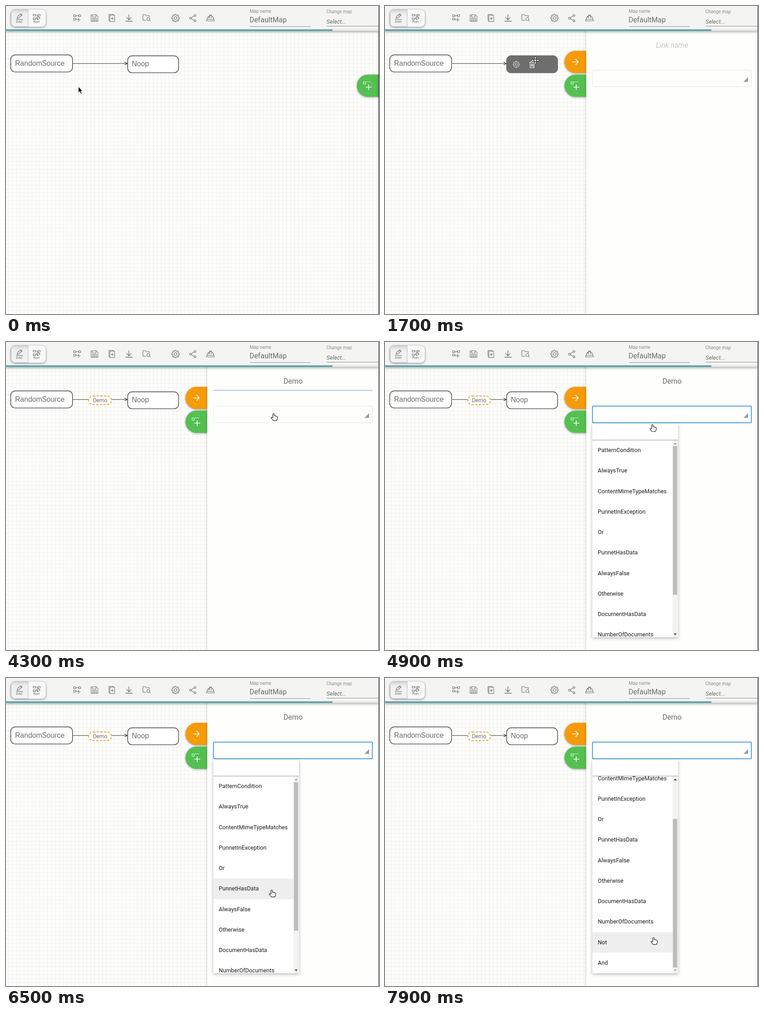
An HTML page that plays this animation: 824x680 px, repeating every 8 s.

```html
<!DOCTYPE html>
<html lang="en">
<head>
<meta charset="utf-8">
<title>Link condition demo</title>
<style>
  html, body { margin: 0; width: 100%; height: 100%; overflow: hidden; background: #fefefd; }
  svg { display: block; }
  text { font-family: Roboto, sans-serif; fill: #6b6b6b; }
  .node rect { fill: #fff; stroke: #707070; stroke-width: 1.9; }
  .node text { font: 15.75px "Liberation Sans", Arial, sans-serif; }
  .icon { fill: none; stroke: #6a6a6a; stroke-width: 1.05; stroke-linejoin: round; }
  .white { stroke: #fff; }
  .label { font-size: 10.05px; fill: #8c8c8c; }
  .small { font-size: 8px; letter-spacing: .3px; text-anchor: middle; }
  .middle { text-anchor: middle; }
  .rule { stroke: #8a8a8a; }
  .tab { filter: drop-shadow(0 1px 2px rgba(0,0,0,.4)); }
  #items text { font-size: 12.67px; fill: #1d1d1d; }
</style>
</head>
<body>
<svg width="824" height="680" viewBox="0 0 824 680">
  <defs>
    <pattern id="grid" x="4.8" y="4.8" width="8.66" height="8.66" patternUnits="userSpaceOnUse">
      <path d="M0 .5H8.66M.5 0V8.66" stroke="#eeeeeb" fill="none"/>
    </pattern>
    <linearGradient id="inset" x2="0" y2="1">
      <stop stop-color="#d9d9d9"/><stop offset=".25" stop-color="#efefef"/><stop offset="1" stop-color="#f3f3f3"/>
    </linearGradient>
    <clipPath id="listClip"><rect x="458" y="217" width="190" height="435"/></clipPath>
    <path id="gear"/>
    <path id="flow" d="M-7.500-6.500h4.500v4h-4.500zM3.500-6.500h4.500v4H3.500zM-3-4.500H3.500M-7.500 1h4.500v4h-4.500zM-3 3H-.5M3.500 0V9M-1 4.500H8"/>
    <path id="tabShape" d="M49 0H24.500a24.500 24.500 0 0 0 0 49H49z"/>
  </defs>

  <rect width="824" height="680" fill="#fefefd"/>
  <rect y="55" width="813" height="625" fill="url(#grid)"/>

  <g stroke="#333" fill="none" stroke-width="1.2"><path d="M148 127H268M262 124L268.500 127 262 130"/></g>
  <g class="node">
    <rect x="10.500" y="108" width="136.500" height="37.600" rx="10"/>
    <text x="20" y="131.800">RandomSource</text>
    <rect id="noop" x="268.800" y="110" width="112.400" height="37.400" rx="10"/>
    <text id="noopText" x="278" y="133.300">Noop</text>
  </g>
  <g id="noopTools" class="icon white">
    <use href="#gear" transform="translate(290 129) scale(.82)"/>
    <path d="M319 124.500h12M322.500 124.500v-2.500h5v2.500M320 124.500l.8 12h8.400l.8-12M323 127v7M325 127v7M327 127v7"/>
  </g>
  <g id="chip">
    <rect id="chipBox" y="119.300" height="19" rx="9.500" fill="#fff" stroke="#e5a62c" stroke-width="1.900" stroke-dasharray="5 3"/>
    <text id="chipText" class="middle" x="208" y="132.800" font-size="12"/>
  </g>

  <g id="panel">
    <g id="linkTab" class="tab">
      <use href="#tabShape" x="-48" y="99" fill="#f59a08"/>
      <path d="M-31 123.500h13M-24 117l6.500 6.500-6.500 6.500" fill="none" stroke="#fff" stroke-width="1.600"/>
    </g>
    <g class="tab">
      <use href="#tabShape" x="-48" y="151.500" fill="#54c052"/>
      <path d="M-22 173v12.500M-28 179.300h12.500" fill="none" stroke="#fff" stroke-width="1.500"/>
      <path d="M-33.500 167.500h5v5h-5z" fill="none" stroke="#fff"/>
      <path d="M-27 167.500H-17" stroke="#fff" stroke-dasharray="3 1.500"/>
    </g>
    <rect id="sheet" y="50" width="390" height="640" fill="#fefefd" style="filter:drop-shadow(-1px 0 2px rgba(0,0,0,.2))"/>
    <text id="linkName" class="middle" x="189.500" y="92.300" font-size="16"/>
    <path id="caret" stroke="#444" fill="none"/>
    <path id="underline" stroke="#5b9fc4" stroke-width="1.200"/>
    <rect id="select" x="13.800" y="141.500" width="351" height="36.700" rx="2" fill="none"/>
    <path d="M347.500 167.500l10-10.500v10.500z" fill="#999"/>
  </g>

  <g id="dropdown">
    <rect x="458" y="180" width="189.500" height="472" fill="#fff" style="filter:drop-shadow(0 2px 3px rgba(0,0,0,.3))"/>
    <g clip-path="url(#listClip)">
      <g id="items"><rect id="hover" x="458" width="177" height="45.250" fill="#eee"/></g>
      <rect x="635" y="217" width="12" height="435" fill="#f3f3f3"/>
      <rect id="thumb" x="636" width="9.500" height="328" fill="#bdbdbd"/>
      <path id="up" d="M637.500 226h7l-3.500-4z"/>
      <path id="down" d="M637.500 643.500h7l-3.500 4z"/>
    </g>
    <path d="M458 216.500H647.500" stroke="#999"/>
  </g>

  <g id="toolbar">
    <rect width="824" height="55" fill="#f4f4f3" style="filter:drop-shadow(0 2px 3px rgba(0,0,0,.35))"/>
    <rect y="51.500" width="824" height="3.500" fill="#e4e6e6"/>
    <rect y="51.500" width="721" height="3.500" fill="#59a3a8"/>
    <rect x="11" y="8" width="77" height="38" rx="9" fill="#f8f8f8" style="filter:drop-shadow(0 1px 2px rgba(0,0,0,.5))"/>
    <path d="M49 8.500H20a8.500 8.500 0 0 0-8.500 8.500V37a8.500 8.500 0 0 0 8.500 8.500H49z" fill="url(#inset)" stroke="#bbb"/>
    <text class="small" x="29.500" y="37.300">Edit</text>
    <text class="small" x="67.500" y="37.300">Run</text>
    <g class="icon">
      <path d="M24.500 27l1.200-4 7.300-6 2.800 3-7.300 6zM31 18.600l2.800 3M22 29.500h15.500"/>
      <path d="M60 18.500h5v3.500H60zM60 26.500h5v3.500H60zM65 20.300H71M65 28.300H67.500V24M69.500 22.800l6 3.700-6 3.700zM71 18.500h4.500v3.500H71z"/>
      <use href="#flow" x="157" y="26"/>
      <path d="M188 19.500h12l3 3V34h-15zM191 19.500v5h8v-5M191 34v-6.500h9V34M193 30h5M193 32h5"/>
      <path d="M229.500 20.500h10.500V34.500h-10.500zM229.500 32h-2V18.500h10v2M234.800 24v7M231.300 27.500h7"/>
      <path d="M271.500 18.500V30M266 25l5.500 5.500 5.500-5.500M264 33.500h15.500" stroke-width="1.300"/>
      <path d="M310 31.500h-7.500V19h5l2 2.500h7.500v3M319.500 34l-3-3"/>
      <circle cx="314.500" cy="28.800" r="3.200"/>
      <use href="#gear" x="374.500" y="26.500"/>
      <path d="M409.500 25.800l6-4M409.500 27.800l6 3.700"/>
      <circle cx="407.500" cy="26.800" r="2.100"/><circle cx="417.500" cy="20.800" r="2.100"/><circle cx="417.500" cy="32.500" r="2.100"/>
      <path d="M443.500 29.500h16.500v3.500h-16.500zM445 29.500v-2a6.800 6.800 0 0 1 13.500 0v2M449.800 27V19.500h4V27M447.800 23v3"/>
    </g>
    <text class="label" x="538.500" y="15.300">Map name</text>
    <text x="538" y="36" font-size="15.850">DefaultMap</text>
    <text class="label" x="707.700" y="16">Change map</text>
    <text x="708" y="39" font-size="12.700" font-style="italic">Select...</text>
    <path class="rule" d="M539 45.500H673M708 44.500H823"/>
  </g>
  <rect x="823" width="1" height="680" fill="#2b2b2b"/>

  <g id="cursors" stroke-linejoin="round">
    <path id="arrow" d="M0 0V13.500L3 10.800 5.200 15.800 7.500 14.800 5.300 10H9z" fill="#111" stroke="#fff" stroke-width=".7"/>
    <path id="hand" d="M-1.500 1Q0-1 1.500 1V5Q4.500 4.500 6.500 6 8.800 6.300 8.800 8.500L8 13Q7.500 15.300 5 15.300H0Q-2 15-3 12.500L-5.500 9.300Q-5 7.300-1.500 9.300z" fill="#fff" stroke="#222" stroke-width="1.200"/>
    <g id="move" stroke="#222" fill="#fff">
      <path d="M0-8.500L3-5H1.200V-1.200H5V-3L8.500 0 5 3V1.200H1.200V5H3L0 8.500-3 5H-1.200V1.200H-5V3L-8.500 0-5-3V-1.200H-1.200V-5H-3z"/>
      <circle r="2.500"/>
    </g>
    <path id="beam" d="M-3-8H-1L0-7 1-8H3M0-7V7M-3 8H-1L0 7 1 8H3" fill="none" stroke="#333"/>
  </g>
</svg>
<script>
const LOOP = 8000, STEP = 100, ROW = 45.25, LIST_TOP = 216.6;
const $ = id => document.getElementById(id);
const set = (id, attrs) => { for (const k in attrs) $(id).setAttribute(k, attrs[k]); };
const show = (id, on) => set(id, { visibility: on ? "visible" : "hidden" });
const clamp = v => Math.max(0, Math.min(1, v));
const ease = v => v * v * (3 - 2 * v);

const names = ["PatternCondition", "AlwaysTrue", "ContentMimeTypeMatches", "PunnetInException", "Or",
  "PunnetHasData", "AlwaysFalse", "Otherwise", "DocumentHasData", "NumberOfDocuments", "Not", "And"];
names.forEach((name, i) => {
  const text = document.createElementNS("http://www.w3.org/2000/svg", "text");
  text.setAttribute("x", 470);
  text.setAttribute("y", LIST_TOP + ROW * i + 26.6);
  text.textContent = name;
  $("items").append(text);
});

function gearPath() {
  const point = (r, a) => `${(r * Math.cos(a)).toFixed(2)} ${(r * Math.sin(a)).toFixed(2)}`;
  const points = [];
  for (let i = 0; i < 8; i++)
    for (const [r, d] of [[6.3, -.26], [8.6, -.17], [8.6, .17], [6.3, .26]])
      points.push(point(r, i * Math.PI / 4 + d));
  return `M${points.join("L")}zM3 0A3 3 0 1 1-3 0A3 3 0 1 1 3 0`;
}
set("gear", { d: gearPath() });

// Each row: time followed by the values reached at that time.
const pointer = [[0, 160, 178], [300, 160, 178], [400, 163, 174], [500, 163, 174], [900, 190, 127],
  [1600, 190, 127], [1700, 332, 120], [2000, 640, 87], [3800, 640, 87], [4300, 591, 158], [4800, 592, 162],
  [5500, 582.5, 305], [5700, 583, 325], [6500, 587, 468], [6700, 587, 472], [7400, 589, 530], [7900, 593, 573]];
const scrolling = [[0, 0], [6900, 0], [7400, 87], [7500, 87], [7700, 108]];

function sample(keys, t) {
  const next = keys.findIndex(key => key[0] > t);
  if (next < 0) return keys.at(-1).slice(1);
  const a = keys[next - 1], b = keys[next], p = (t - a[0]) / (b[0] - a[0]);
  return a.slice(1).map((v, i) => v + (b[i + 1] - v) * p);
}

function hoveredRow(t) {
  const y = sample(pointer, t)[1];
  return y < 217 ? -1 : Math.floor((y - LIST_TOP + sample(scrolling, t)[0]) / ROW);
}

function drawLink(t) {
  const typed = "Demo".slice(0, [2800, 3000, 3200, 3300].filter(at => t >= at).length);
  const onNoop = t === 1700;
  show("noopText", !onNoop);
  show("noopTools", onNoop);
  $("noop").style.fill = onNoop ? "#6e6e6e" : "#fff";

  show("chip", typed);
  $("chipText").textContent = typed;
  const width = $("chipText").getComputedTextLength() + 18.5;
  set("chipBox", { x: 208 - width / 2, width });

  const name = $("linkName");
  name.textContent = typed || "Link name";
  name.style.fill = typed ? "#6b6b6b" : "#c6c6c6";
  name.style.fontStyle = typed ? "normal" : "italic";
  const caretX = Math.round(189.5 + (typed ? name.getComputedTextLength() / 2 : 0)) + .5;
  set("caret", { d: `M${caretX} 78V96` });
  show("caret", t >= 2200 && t < 3400);
}

function drawPanel(t) {
  const x = 823 - 378.5 * ease(clamp((t - 900) / 400));
  set("panel", { transform: `translate(${x} 0)` });
  show("linkTab", t > 900);
  const focus = t < 4500 ? clamp((t - 2200) / 300) * 176 : 0;
  set("underline", { d: `M${189.5 - focus} 106.500H${189.5 + focus}` });
  const open = t >= 4500;
  set("select", { stroke: open ? "#4b9fd6" : "#e4e4e4", "stroke-width": open ? 2 : 1 });
}

function drawDropdown(t) {
  show("dropdown", t >= 4600);
  const [scroll] = sample(scrolling, t), row = hoveredRow(t);
  set("items", { transform: `translate(0 ${-scroll})` });
  set("hover", { y: LIST_TOP + ROW * row, opacity: row < 0 || t < 4600 ? 0 : row === hoveredRow(t - STEP) ? 1 : .6 });
  set("thumb", { y: 230 + scroll * .75 });
  set("up", { fill: scroll > 0 ? "#444" : "#a3a3a3" });
  set("down", { fill: scroll < 108 ? "#444" : "#a3a3a3" });
}

function drawPointer(t) {
  const [x, y] = sample(pointer, t);
  const kind = t === 1700 ? "move"
    : x > 458 && y > 76 && y < 98 ? "beam"
    : (t >= 900 && t < 1700) || y > 140 && t > 4000 ? "hand" : "arrow";
  set("cursors", { transform: `translate(${x} ${y})` });
  for (const id of ["arrow", "hand", "move", "beam"]) show(id, id === kind);
}

function frame() {
  const t = Math.floor(performance.now() % LOOP / STEP) * STEP;
  drawLink(t);
  drawPanel(t);
  drawDropdown(t);
  drawPointer(t);
  requestAnimationFrame(frame);
}
frame();
</script>
</body>
</html>
```
